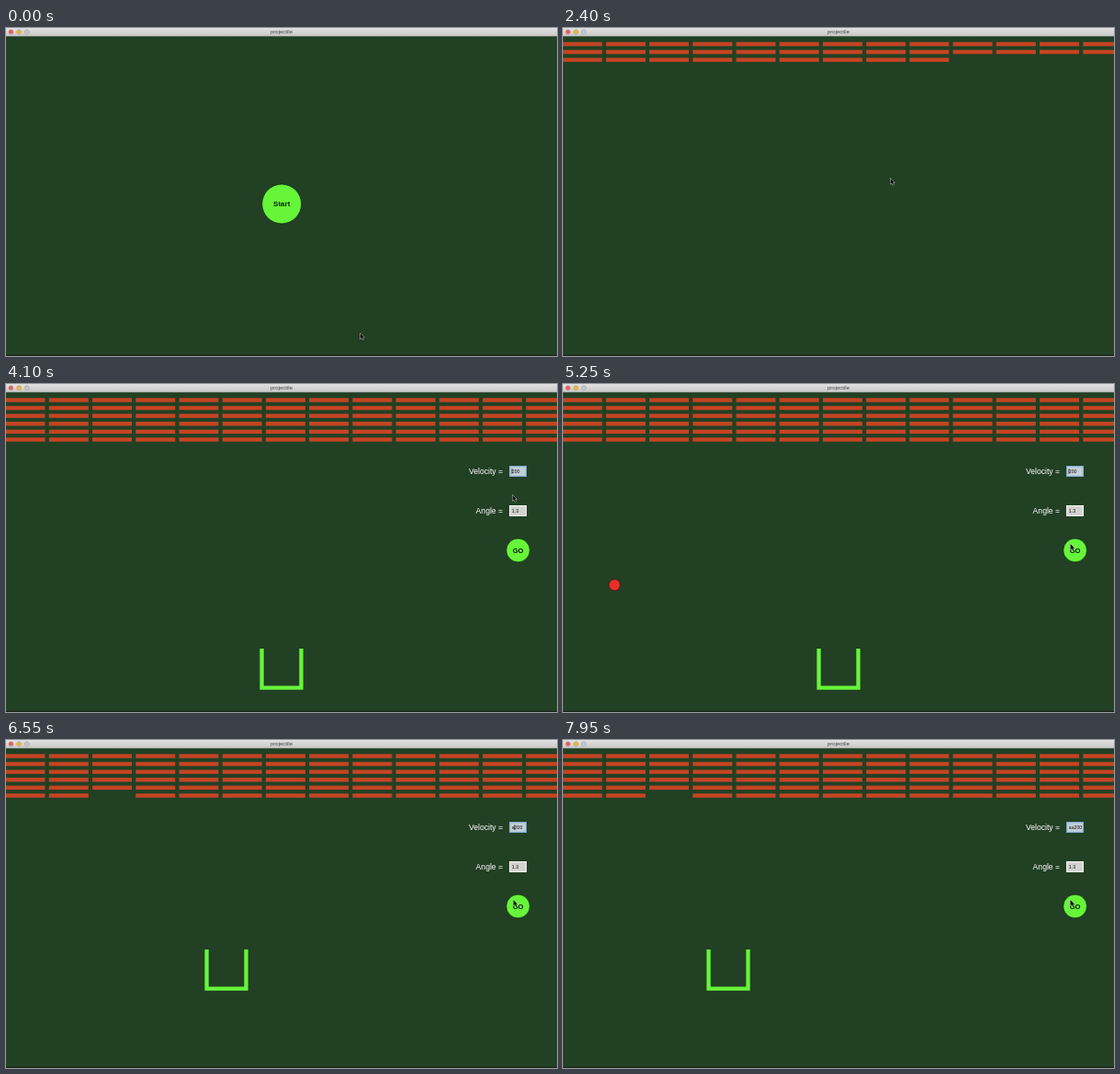
These frames come from a looping animation (600 by 357 pixels, 8000 ms). An HTML page with a canvas:

```html
<!DOCTYPE html>
<html lang="en">
<head>
<meta charset="utf-8">
<title>projectile</title>
<style>
  html, body { margin: 0; overflow: hidden; background: #224024; }
  canvas { display: block; width: 600px; height: 357px; }
</style>
</head>
<body>
<canvas id="stage" width="600" height="357"></canvas>
<script>
const ctx = document.getElementById('stage').getContext('2d');
const LOOP = 8000, STEP = 50;
const GREEN = '#67f53a', BRICK = '#c64423';
const BRICKS = { start: 1800, cols: 13, total: 78 };
const READY = 3200;
const SHOT = { start: 5063, end: 5917, rate: 3, speed: 200, angle: 1.3, scale: 0.43 };

// Pointer stops: time, x, y
const POINTER = [
  [300, 385.5, 332], [700, 461, 262], [1100, 366, 222], [1500, 304, 189],
  [2000, 304, 189], [2400, 356.5, 163.5], [3100, 450.5, 165],
  [3700, 551, 94], [3950, 551, 94], [4400, 552.5, 174]
];

function rect(x, y, w, h, color) {
  ctx.fillStyle = color;
  ctx.fillRect(x, y, w, h);
}

function disc(x, y, r, color, edge) {
  ctx.beginPath();
  ctx.arc(x, y, r, 0, 2 * Math.PI);
  ctx.fillStyle = color;
  ctx.fill();
  if (edge) {
    ctx.strokeStyle = edge;
    ctx.lineWidth = 0.6;
    ctx.stroke();
  }
}

function text(str, x, y, size, color, align = 'left', weight = 'normal') {
  ctx.font = `${weight} ${size}px "Liberation Sans", Arial, sans-serif`;
  ctx.textAlign = align;
  ctx.fillStyle = color;
  ctx.fillText(str, x, y);
}

function roundButton(label, x, y, r, size) {
  disc(x, y, r, GREEN, '#0b1a0c');
  text(label, x, y + size * 0.36, size, '#0a180a', 'center', 'bold');
}

function titleBar() {
  const shade = ctx.createLinearGradient(0, 0, 0, 9);
  shade.addColorStop(0, '#e2e1e2');
  shade.addColorStop(1, '#c9c8c9');
  rect(0, 0, 600, 9, shade);
  rect(0, 8.6, 600, 0.6, '#8f958f');
  ['#f4574e', '#f5b42f', '#c6c5c6'].forEach((c, i) => disc(5.4 + 8.7 * i, 4.3, 2.5, c, '#a9a5a4'));
  text('projectile', 300, 6.4, 6, '#454545', 'center');
}

function bricks(t) {
  const shown = Math.min(BRICKS.total, 3 * (t - BRICKS.start) / STEP - 1);
  for (let i = 0; i < shown; i++) {
    const col = i % BRICKS.cols, row = Math.floor(i / BRICKS.cols);
    const broken = row === 5 && col === 2 && t >= SHOT.end;
    if (!broken) rect(-0.4 + 47.22 * col, 15.3 + 8.6 * row, 43, 4.4, BRICK);
  }
}

function field(y, value, focused) {
  rect(548, y, 19, 12, focused ? '#82acd0' : '#f0f0ee');
  rect(549.2, y + 1.2, 16.6, 9.6, focused ? '#c3d0d6' : '#d2d3d0');
  text(value, 550.8, y + 7.8, 5.2, '#111');
}

function controls(t) {
  const typed = 'a'.repeat((t >= 6100) + (t >= 7250));
  text('Velocity =', 541, 97.8, 8.6, '#fff', 'right');
  text('Angle =', 541, 140.8, 8.6, '#fff', 'right');
  field(89, typed + '200', t >= 3750);
  field(132, '1.3', false);
  if (t >= 3750 && t % 600 >= 300) rect(550.6 + 2.9 * typed.length, 92.3, 0.7, 5.6, '#111');
  roundButton('GO', 557.6, 181, 12.8, 7.6);
}

function basket(t) {
  const x = 276.4 - 60 * ((t >= 6100) + (t >= 7250));
  const y = t >= 5800 ? 228 : 288;
  ctx.strokeStyle = GREEN;
  ctx.lineWidth = 4.3;
  ctx.beginPath();
  ctx.moveTo(x + 2.15, y);
  ctx.lineTo(x + 2.15, y + 42.6);
  ctx.lineTo(x + 45.1, y + 42.6);
  ctx.lineTo(x + 45.1, y);
  ctx.stroke();
}

function ball(t) {
  if (t < SHOT.start || t >= SHOT.end) return;
  const s = (t - SHOT.start) / 1000 * SHOT.rate;
  const x = 43.2 + SHOT.scale * SHOT.speed * Math.cos(SHOT.angle) * s;
  const rise = SHOT.speed * Math.sin(SHOT.angle) * s - 4.9 * s * s;
  disc(x, 264.6 - SHOT.scale * rise, 6.2, '#e92e26', '#141c10');
}

function pointerAt(t) {
  const next = POINTER.findIndex(p => p[0] > t);
  if (next === 0) return POINTER[0].slice(1);
  if (next < 0) return POINTER[POINTER.length - 1].slice(1);
  const [t0, x0, y0] = POINTER[next - 1], [t1, x1, y1] = POINTER[next];
  const k = (t - t0) / (t1 - t0);
  return [x0 + (x1 - x0) * k, y0 + (y1 - y0) * k];
}

function pointer(t) {
  ctx.save();
  ctx.translate(...pointerAt(t));
  const arrow = new Path2D('M0 0V6.4L1.5 5.1L2.6 7.5L3.7 7L2.7 4.7H4.6Z');
  ctx.lineWidth = 0.9;
  ctx.strokeStyle = '#dfe5df';
  ctx.stroke(arrow);
  ctx.fillStyle = '#080c08';
  ctx.fill(arrow);
  ctx.restore();
}

function draw(now) {
  const t = Math.floor(now % LOOP / STEP) * STEP;
  rect(0, 0, 600, 357, '#224024');
  rect(0, 355.8, 600, 1.2, '#152617');
  titleBar();
  if (t < BRICKS.start) {
    roundButton('Start', 300.2, 191.5, 21.4, 8);
  } else {
    bricks(t);
  }
  if (t >= READY) {
    controls(t);
    basket(t);
    ball(t);
  }
  pointer(t);
}

const began = performance.now();
function frame() {
  draw(performance.now() - began);
  requestAnimationFrame(frame);
}
frame();
</script>
</body>
</html>
```
